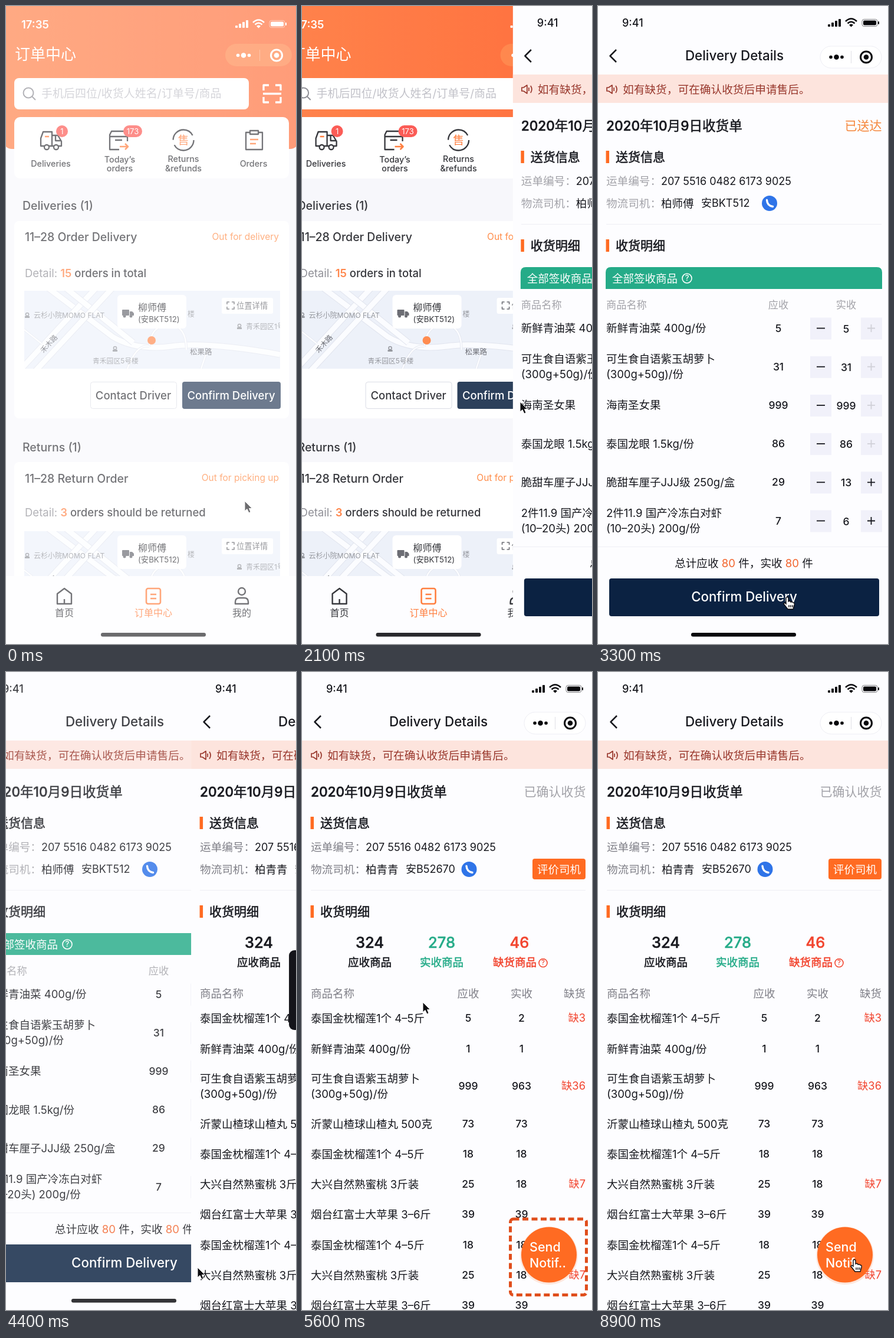
These frames come from a looping animation (492 by 1080 pixels, 9 s). An HTML page:

```html
<!DOCTYPE html>
<html lang="zh-CN">
<head>
<meta charset="utf-8">
<title>Delivery flow</title>
<style>
html, body { margin: 0; width: 100%; height: 100%; overflow: hidden; background: #fff; }
svg { display: block; }
text { font-family: Inter, "Noto Sans CJK SC", "Noto Sans CJK", sans-serif; white-space: pre; }
</style>
</head>
<body>
<svg id="stage" width="100%" height="100%" viewBox="0 0 492 1080"></svg>
<script>
const INK = '#17181e', GREY = '#a2a2a8', DIM = '#7e7e86', ORANGE = '#ff6b22', RED = '#f2452f',
  GREEN = '#25ab88', NAVY = '#0b2242', PALE = '#f1f1fa', RULE = '#eeeef4';

const text = (x, y, size, str, fill = INK, weight = 400, anchor = 'start') =>
  `<text x="${x}" y="${y}" font-size="${size}" fill="${fill}" font-weight="${weight}" text-anchor="${anchor}">${str}</text>`;
const mid = (x, y, size, str, fill, weight = 500) => text(x, y, size, str, fill, weight, 'middle');
const end = (x, y, size, str, fill, weight) => text(x, y, size, str, fill, weight, 'end');
const span = (str, fill, weight = 500) => `<tspan fill="${fill}" font-weight="${weight}">${str}</tspan>`;
// A thin outline gives Chinese glyphs a medium weight.
const medium = (body, color = INK) => `<g stroke="${color}" stroke-width=".5">${body}</g>`;
const rect = (x, y, w, h, fill, r = 0, extra = '') =>
  `<rect x="${x}" y="${y}" width="${w}" height="${h}" rx="${r}" fill="${fill}" ${extra}/>`;
const circle = (x, y, r, fill, extra = '') => `<circle cx="${x}" cy="${y}" r="${r}" fill="${fill}" ${extra}/>`;
const ring = (x, y, r, color, width) => circle(x, y, r, 'none', `stroke="${color}" stroke-width="${width}"`);
const line = (d, color, width = 2, extra = '') =>
  `<path d="${d}" fill="none" stroke="${color}" stroke-width="${width}" stroke-linejoin="round" ${extra}/>`;
const at = (x, y, body, extra = '') => `<g transform="translate(${x} ${y}) ${extra}">${body}</g>`;

function statusIcons(color) {
  const bars = [0, 1, 2, 3].map(i => rect(i * 6, 10 - i * 3, 4, 4 + i * 3, color, 1)).join('');
  return bars +
    line('M30 5Q39.5 -4 49 5M33.5 8.5Q39.5 3 45.5 8.5', color, 2.6) +
    `<path d="M36 11Q39.5 8 43 11L39.5 14.5Z" fill="${color}"/>` +
    rect(58, 1.5, 26, 12, 'none', 3.5, `stroke="${color}" stroke-opacity=".5"`) +
    rect(60, 3.5, 22, 8, color, 2) + rect(85, 5, 2, 5, color, 1);
}

const capsule = (x, y, color, gap) => at(x, y,
  circle(-9.5, 0, 2.8, color) + circle(0, 0, 4.3, color) + circle(9.5, 0, 2.8, color) +
  ring(gap, 0, 9.5, color, 3) + circle(gap, 0, 4.3, color));

const help = (x, y, r, color) => ring(x, y, r, color, 1.6) + mid(x, y + r * .55, r * 1.6, '?', color);

const homeBar = x => rect(x, 1061, 178, 6.5, '#08080c', 3.2);

function map(y) {
  const roads = ['M40-5L150 78Q190 102 250 94T434 108', 'M122-5L-5 132', 'M70-5L185 88', 'M150-5L15 140',
    'M212 95Q215 58 245 58T275 100', 'M175 132Q190 90 212 94', 'M300 132L310 102', 'M-5 62L30 90'];
  const place = '#85888f', dark = '#55575f';
  const pin = (x, y) => ring(x, y - 2, 2.6, place, 1.5) + rect(x - 4, y + 1, 8, 3, place);
  return `<svg x="31" y="${y}" width="434" height="132">` +
    rect(0, 0, 434, 132, '#ebeff9') +
    roads.map((d, i) => line(d, '#dde1ec', i < 4 ? 11 : 4) + line(d, '#fbfcff', i < 4 ? 9 : 2.5)).join('') +
    pin(5, 42) + text(16, 46, 12, '云杉小院MOMO FLAT', place) +
    pin(365, 61) + text(376, 65, 12, '青禾园区1号', place) +
    pin(154, 99) + text(116, 123, 11.8, '青禾园区5号楼', place) +
    text(277, 44, 12, '楼', place) + text(281, 108, 12.5, '松果路', dark, 500) +
    at(42, 90, mid(0, 4, 12, '禾木路', dark), 'rotate(-47)') +
    rect(158, 7, 117, 57, '#fff', 6) +
    at(166, 32, rect(0, 0, 12, 10, dark, 1) + `<path d="M13 3H17L20 6V10H13Z" fill="${dark}"/>` +
      circle(4, 11, 2.5, dark) + circle(15, 11, 2.5, dark)) +
    text(193, 34, 16, '柳师傅', INK, 500) + text(193, 53, 13.3, '(安BKT512)') +
    rect(335, 12, 87, 27, '#fff', 3) +
    line('M344 23V19H348M352 19H356V23M356 27V31H352M348 31H344V27', dark, 1.6) +
    text(360, 30, 13.3, '位置详情', dark) +
    circle(216, 84, 7, '#ff7a35') + '</svg>';
}

function ordersScreen() {
  const white = '#fff';
  const icon = (x, d, accent) => at(x, 227, line(d, INK, 2.3) + line(accent, ORANGE, 2.5));
  const badge = (x, w, str) => rect(x - w / 2, 202, w, 20, '#fb433c', 10) + mid(x, 217, 13, str, white, 400);
  const label = (x, y, str) => mid(x, y, 14.3, str, INK);
  const detail = (y, n, str) =>
    text(32, y, 18.5, span('Detail: ', DIM, 400) + span(n, '#ff7430', 600) + ' ' + str, INK, 500);
  const order = (y, title, state, stateY) =>
    text(32, y, 19.5, title, INK, 500) + end(463, stateY, 15.5, state, '#ff7a2c');
  return rect(0, 0, 492, 1080, '#f6f6fb') +
    '<defs><linearGradient id="head"><stop stop-color="#ff7030"/><stop offset="1" stop-color="#ff5a20"/></linearGradient></defs>' +
    '<path d="M0 0H492V238Q488 242 482 242H10Q4 242 0 238Z" fill="url(#head)"/>' +
    text(26, 38, 18.5, '17:35', white, 600) + at(389, 23, statusIcons(white)) +
    text(15, 91, 26, '订单中心', white, 500) +
    rect(372, 64, 113, 38, '#ffa050', 19, 'opacity=".35"') + rect(430, 74, 1, 19, white, 0, 'opacity=".3"') +
    capsule(403, 83.5, white, 56) +
    rect(14, 122, 398, 53, white, 8) +
    ring(38, 147, 8.5, DIM, 2) + line('M44 153L50 159', DIM) +
    text(60, 155, 19, '手机后四位/收货人姓名/订单号/商品', '#b8b8c0') +
    line('M437 143V134H446M457 134H466V143M466 154V163H457M446 163H437V154M436 148.5H467', white, 3.3) +
    rect(14, 188, 466, 104, white, 10) +
    icon(76, 'M-11 10H-17V-3L-13-14H2V10H-3M2-8H12L18 2V10H13M5 10H2M8-8V1H18', 'M-10-6H-3') +
    [69, 85].map(x => circle(x, 239, 4, white, `stroke="${INK}" stroke-width="2.3"`)).join('') +
    badge(95, 20, '1') + label(76, 272, 'Deliveries') +
    icon(191, 'M1 16H-15V-9L-12-15H12L15-9V2M-15-6H15M-6 0H6', 'M2 11H16M11 6L16 11 11 16') +
    badge(215, 32, '173') + label(193, 265, 'Today’s') + label(193, 280, 'orders') +
    circle(301, 227, 17.5, 'none', `stroke="${INK}" stroke-width="2.3" stroke-dasharray="46 9"`) +
    mid(301, 234, 19, '售', ORANGE) + label(301, 264, 'Returns') + label(301, 280, '&amp;refunds') +
    icon(421, 'M-7-13H-14V16H14V-13H7M-7-16H7V-10H-7Z', 'M-7-1H7M-7 6H3') + label(420, 272, 'Orders') +
    text(28, 345, 19.5, 'Deliveries (1)', INK, 500) +
    rect(14, 364, 466, 334, white, 8) +
    order(398, '11–28 Order Delivery', 'Out for delivery', 396) +
    detail(459, '15', 'orders in total') + map(482) +
    rect(143.5, 636.5, 146, 45, white, 4, 'stroke="#d6d8e2"') + mid(216, 666, 18.5, 'Contact Driver', INK) +
    rect(299, 636, 167, 46, NAVY, 4) + mid(382, 666, 18.5, 'Confirm Delivery', white) +
    text(28, 754, 19.5, 'Returns (1)', INK, 500) +
    rect(14, 772, 466, 300, white, 8) +
    order(807, '11–28 Return Order', 'Out for picking up', 804) +
    detail(864, '3', 'orders should be returned') + map(889) +
    rect(0, 965, 492, 115, '#fdfdff') +
    line('M87 1012V995L99 986 111 995V1012ZM99 1012V1004', INK, 2.4) + mid(99, 1033, 16, '首页', INK, 400) +
    rect(238, 986, 24, 26, 'none', 3, `stroke="${ORANGE}" stroke-width="2.6"`) + line('M245 996H255M245 1003H255', ORANGE, 2.4) +
    mid(250, 1033, 16, '订单中心', ORANGE, 400) +
    ring(400, 991, 6, INK, 2.4) +
    line('M389 1012V1009Q389 1002 396 1002H404Q411 1002 411 1009V1012Z', INK, 2.4) + mid(400, 1033, 16, '我的', INK, 400) +
    homeBar(161);
}

// Parts shared by both delivery pages; x is the left margin.
function deliveryTop(x, state, stateColor, labelColor, driver, plate, phoneX) {
  const heading = (y, str) => rect(x - .5, y - 18, 5.5, 21, ORANGE) + medium(text(x + 16, y, 21, str, INK, 500));
  const brown = '#98372c';
  return rect(0, 0, 492, 1080, '#fdfdff') +
    text(41, 35, 18, '9:41', INK, 500) + at(390, 21, statusIcons('#08080c')) +
    line(`M${x + 17} 74L${x + 6.5} 84.5 ${x + 17} 95`, INK, 2.5) + mid(231.5, 92, 22.4, 'Delivery Details', INK) +
    rect(377, 68, 104, 37, '#fff', 18.5, `stroke="${RULE}"`) + rect(429, 76, 1, 21, '#e0e0e6') +
    capsule(404.5, 86.5, '#08080c', 50.5) +
    rect(0, 116, 492, 48, '#fde4dd') +
    line(`M${x + 1} 138V144H${x + 4}L${x + 10} 148V134L${x + 4} 138ZM${x + 13} 138V144M${x + 16} 135Q${x + 20} 141 ${x + 16} 147`, brown, 1.7) +
    text(x + 28, 148, 18.7, '如有缺货，可在确认收货后申请售后。', brown) +
    medium(text(x, 211, 22.6, '2020年10月9日收货单', INK, 500)) + end(481.5, 210, 21, state, stateColor) +
    heading(263, '送货信息') + heading(413, '收货明细') +
    text(x, 303, 18.6, '运单编号：', labelColor) + text(x + 93, 303, 18, '207 5516 0482 6173 9025') +
    text(x, 341, 18.6, '物流司机：', labelColor) + text(x + 93, 341, 18.5, driver) + text(x + 161, 340, 18, plate) +
    circle(phoneX, 334, 13, '#2f74e8') +
    line(`M${phoneX - 4.5} 328.5Q${phoneX - 4} 338 ${phoneX + 5.5} 339.5`, '#fff', 3.4, 'stroke-linecap="round"') +
    line(`M${x} 369.5H481`, RULE, 1);
}

const lines = (x, y, name) => name.length < 2 ? text(x, y + 6.5, 18.5, name[0]) :
  text(x, y - 6.5, 18.5, name[0]) + text(x, y + 19.5, 18.5, name[1]);

function checkScreen() {
  const rows = [['新鲜青油菜 400g/份', 5, 5], ['可生食自语紫玉胡萝卜|(300g+50g)/份', 31, 31], ['海南圣女果', 999, 999],
    ['泰国龙眼 1.5kg/份', 86, 86], ['脆甜车厘子JJJ级 250g/盒', 29, 13], ['2件11.9 国产冷冻白对虾|(10–20头) 200g/份', 7, 6]];
  const list = rows.map(([name, due, got], i) => {
    const y = 545.5 + i * 65.2;
    return lines(14, y, name.split('|')) + mid(306, y + 6, 17.5, due) + mid(421, y + 7, 17.5, got) +
      rect(360, y - 18, 36, 37, PALE) + rect(446, y - 18, 36, 37, PALE) +
      line(`M371 ${y}H385`, INK, 1.8) + line(`M457 ${y}H470M463.5 ${y - 6.5}V${y + 6.5}`, due === got ? '#d0d0d8' : INK, 1.8);
  }).join('');
  const count = span('80', '#f2652e', 400);
  return deliveryTop(14, '已送达', '#f5863a', GREY, '柏师傅', '安BKT512', 291) +
    `<path d="M13 479V451Q13 442 22 442H473Q482 442 482 451V479Z" fill="${GREEN}"/>` +
    text(24, 467.5, 18.5, '全部签收商品', '#fff') + help(151, 461, 8, '#fff') +
    text(14, 512, 17.2, '商品名称', GREY) + mid(306, 512, 17.2, '应收', GREY, 400) + mid(421, 512, 17.2, '实收', GREY, 400) +
    list + line('M0 915.5H492', RULE, 1) +
    mid(247.5, 949.5, 18.6, `总计应收 ${count} 件，实收 ${count} 件`, INK, 400) +
    rect(19, 969, 458, 64, NAVY, 4) + mid(248, 1008, 22.3, 'Confirm Delivery', '#fff') + homeBar(158);
}

function resultScreen() {
  const durian = '泰国金枕榴莲1个 4–5斤', peach = '大兴自然熟蜜桃 3斤装', apple = '烟台红富士大苹果 3–6斤';
  const rows = [[586, durian, 5, 2], [638, '新鲜青油菜 400g/份', 1, 1], [701, '可生食自语紫玉胡萝卜|(300g+50g)/份', 999, 963],
    [765, '沂蒙山楂球山楂丸 500克', 73, 73], [816, durian, 18, 18], [867, peach, 25, 18], [918, apple, 39, 39],
    [970, durian, 18, 18], [1021, peach, 25, 18], [1072, apple, 39, 39]];
  const list = rows.map(([y, name, due, got]) =>
    lines(15, y, name.split('|')) + mid(282, y + 6, 17.5, due) + mid(372.5, y + 6, 17.5, got) +
    (due > got ? end(481, y + 6, 18.3, '缺' + (due - got), RED) : '')).join('');
  const stat = (x, n, labelX, str, color) => medium(mid(x, 467, 25.5, n, color) + mid(labelX, 498, 18.5, str, color), color);
  return deliveryTop(15, '已确认收货', GREY, DIM, '柏青青', '安B52670', 283.5) +
    rect(391, 316, 90, 35, ORANGE, 4) + mid(436, 340.5, 18.5, '评价司机', '#fff') +
    stat(115, 324, 115, '应收商品', INK) + stat(237, 278, 237, '实收商品', GREEN) +
    stat(369, 46, 361, '缺货商品', RED) + help(409, 492.5, 7, RED) +
    text(15, 551, 18.5, '商品名称', DIM) + mid(282, 551, 18.5, '应收', DIM, 400) +
    mid(372.5, 551, 18.5, '实收', DIM, 400) + end(481, 551, 18.5, '缺货', DIM) + list +
    circle(419, 988, 49, ORANGE, 'opacity=".15"') + circle(419, 986.5, 47, ORANGE) +
    text(386, 981, 21.5, 'Send', '#fff', 500) + text(386, 1008, 21.5, 'Notif..', '#fff', 500) +
    `<g id="hint">${rect(353.5, 926, 129, 128.5, 'none', 5, 'stroke="#e04e1c" stroke-width="5" stroke-dasharray="10 5.5"')}</g>` +
    `<g id="toast">${rect(166, 471, 160, 135, '#14141a', 9)}</g>`;
}

const pointer = '<path id="arrow" d="M0 0V17L4 13.5 7 20 10 18.5 7.5 12.5H12.5Z" fill="#0c0c10" stroke="#fff"/>' +
  '<path id="hand" d="M-2 2Q0 -1 2 2V8Q5 6 6 9 9 8 10 10 13 10 12 14L10 21H1L-6 12Q-5 9 -2 12ZM3 14V18M6 14V18M9 14V18" fill="#fff" stroke="#0c0c10" stroke-width="1.4"/>';

document.getElementById('stage').innerHTML =
  [ordersScreen, checkScreen, resultScreen].map((draw, i) => `<g id="page${i}">${draw()}</g>`).join('') +
  `<g id="cursor">${pointer}</g>` + rect(0, 0, 492, 1080, '#fff', 0, 'id="veil"');

const $ = id => document.getElementById(id);
const ease = (t, start, duration) => {
  const k = Math.min(1, Math.max(0, (t - start) / duration));
  return k * k * (3 - 2 * k);
};
const show = (id, on) => $(id).setAttribute('display', on ? 'inline' : 'none');
const move = (id, x, y = 0) => $(id).setAttribute('transform', `translate(${x} ${y})`);

// Cursor moves: start, duration, then the point reached.
const moves = [[500, 900, 370, 670], [2300, 650, 321, 1000], [4050, 200, 325, 1008],
  [4500, 900, 205, 559], [6200, 800, 435, 994]];

function render(t) {
  const slide = [1, ease(t, 1998, 300), ease(t, 4279, 300), 0];
  for (let i = 0; i < 3; i++) {
    move('page' + i, 492 * (1 - slide[i]) - 130 * slide[i + 1]);
    $('page' + i).setAttribute('opacity', 1 - .5 * slide[i + 1]);
    show('page' + i, slide[i] > 0 && slide[i + 1] < 1);
  }
  show('toast', t < 5100);
  show('hint', t >= 5200 && t < 8200);

  let x = 405, y = 838;
  for (const [start, duration, toX, toY] of moves) {
    const k = ease(t, start, duration);
    x += (toX - x) * k;
    y += (toY - y) * k;
  }
  move('cursor', x, y);
  const hand = t > 1250 && t < 2050 || t > 2850 && t < 4330 || t > 6850;
  show('hand', hand);
  show('arrow', !hand);
  $('veil').setAttribute('opacity', .4 * (1 - ease(t, 0, 300)));
}

function tick(now) {
  render(now % 9000);
  requestAnimationFrame(tick);
}
render(0);
requestAnimationFrame(tick);
</script>
</body>
</html>
```
